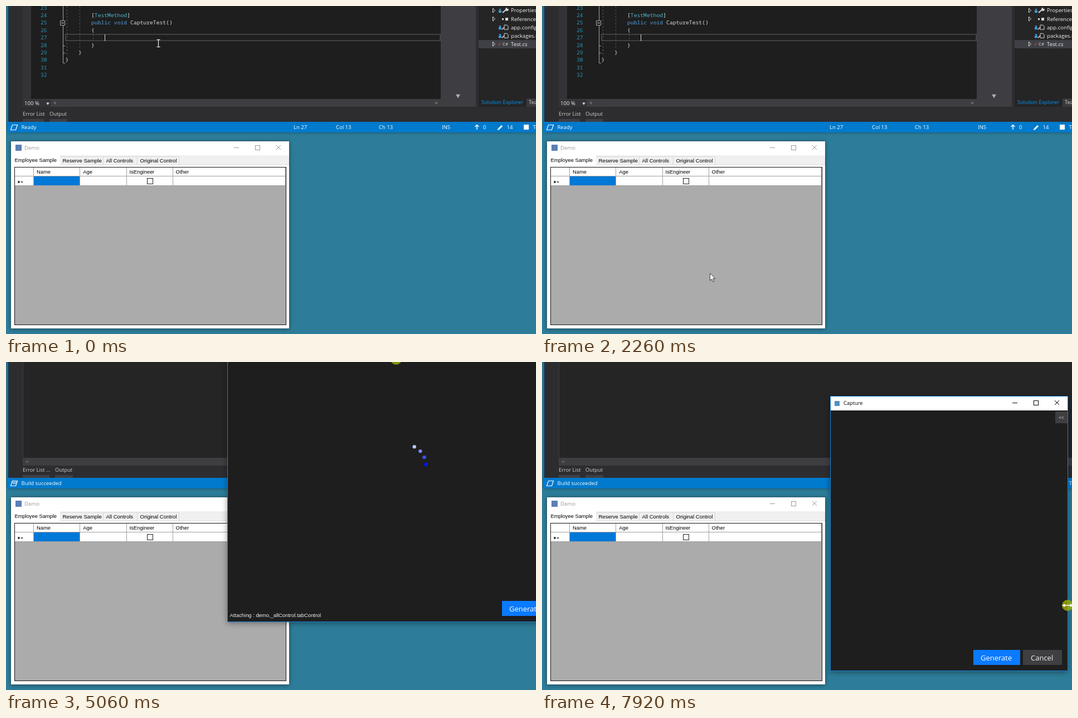
Animation, 951 px wide and 589 px high, one loop 8 s. Source, as an HTML page with a canvas:

```html
<!DOCTYPE html>
<html lang="en">
<head>
<meta charset="utf-8">
<title>Capture demo</title>
<style>
html, body { margin: 0; width: 100%; height: 100%; overflow: hidden; background: #2d7d9a; }
canvas { display: block; }
</style>
</head>
<body>
<canvas id="stage" width="951" height="589"></canvas>
<script>
const g = document.getElementById('stage').getContext('2d');
const LOOP = 8000;
const UI = '"Open Sans", sans-serif', FORM = '"Liberation Sans", sans-serif', MONO = '"Noto Sans Mono", monospace';

// Drawing helpers
function box(x, y, w, h, fill, stroke) {
  if (fill) { g.fillStyle = fill; g.fillRect(x, y, w, h); }
  if (stroke) { g.strokeStyle = stroke; g.lineWidth = 1; g.strokeRect(x + .5, y + .5, w - 1, h - 1); }
}
function text(s, x, y, color, size = 9.6, font = UI) {
  g.font = `${size}px ${font}`;
  g.fillStyle = color;
  g.textBaseline = 'alphabetic';
  g.fillText(s, x, Math.round(y + size * .36));
}
function path(points, fill, stroke, width = 1) {
  g.beginPath();
  points.forEach(([x, y]) => g.lineTo(x, y));
  if (fill) { g.closePath(); g.fillStyle = fill; g.fill(); }
  if (stroke) { g.strokeStyle = stroke; g.lineWidth = width; g.stroke(); }
}
const line = (x1, y1, x2, y2, color, width) => path([[x1, y1], [x2, y2]], null, color, width);
function dot(x, y, r, fill) {
  g.beginPath(); g.arc(x, y, r, 0, 7); g.fillStyle = fill; g.fill();
}
function triangle(x, y, size, angle, color) {
  path([0, 2.1, 4.2].map(a => [x + size * Math.cos(a + angle), y + size * Math.sin(a + angle)]), color);
}
function shadowed(blur, dx, dy, draw) {
  g.save();
  g.shadowColor = 'rgba(0,0,0,.4)';
  g.shadowBlur = blur; g.shadowOffsetX = dx; g.shadowOffsetY = dy;
  draw();
  g.restore();
}
// Linear interpolation through [time, ...values] keys
function track(t, keys) {
  let i = keys.findIndex(k => k[0] > t);
  if (i === 0) return keys[0].slice(1);
  if (i < 0) return keys[keys.length - 1].slice(1);
  const a = keys[i - 1], b = keys[i], f = (t - a[0]) / (b[0] - a[0]);
  return a.slice(1).map((v, n) => v + (b[n + 1] - v) * f);
}

function captions(right, y, color) {
  line(right - 100, y + .5, right - 91, y + .5, color);
  box(right - 62, y - 4, 9, 9, null, color);
  line(right - 24, y - 4, right - 16, y + 4, color);
  line(right - 16, y - 4, right - 24, y + 4, color);
}

function editor(t) {
  box(30, 0, 15, 167, '#333337');
  box(45, 0, 735, 167, '#1e1e1e');
  box(780, 0, 63, 181, '#3e3e42');
  box(30, 167, 750, 14, '#3e3e42');
  triangle(811, 161, 4.5, Math.PI / 2, '#b0b0b0');
  box(30, 168, 50, 13, '#333337');
  text('100 %', 33, 174.5, '#f1f1f1');
  triangle(75, 175, 3, Math.PI / 2, '#ddd');
  triangle(88, 174, 3.5, Math.PI, '#666');
  triangle(772, 174, 3.5, 0, '#666');

  const rowY = n => 3 + (n - 23) * 13.4;
  box(106, 50, 674, 13, null, '#464646');
  box(107, 51, 672, 11, null, '#3a3a3a');
  g.setLineDash([3, 3]);
  [[109.5, 90], [132.5, 77], [156.5, 63]].forEach(([x, y], i) => line(x, i < 2 ? 0 : 51, x, y, '#555'));
  g.setLineDash([]);
  path([[102.5, 0], [102.5, 102.5], [106, 102.5]], null, '#a5a5a5');
  line(102, 71.5, 106, 71.5, '#a5a5a5');
  line(102, 84.5, 106, 84.5, '#a5a5a5');
  box(97, 26, 9, 9, '#1e1e1e', '#a5a5a5');
  line(99, 30.5, 104, 30.5, '#ddd');

  const code = (s, x, n, color) => text(s, x, rowY(n), color, 9.73, MONO);
  for (let n = 23; n <= 32; n++) code(n, 62, n, '#2b91af');
  code('[', 153, 24, '#dcdcdc');
  code('TestMethod', 158.8, 24, '#4db4cc');
  code(']', 217.2, 24, '#dcdcdc');
  code('public void', 153, 25, '#569cd6');
  code('CaptureTest()', 223, 25, '#dcdcdc');
  code('{', 153, 26, '#dcdcdc');
  [[153, 28], [130, 29], [106.6, 30]].forEach(([x, n]) => code('}', x, n, '#dcdcdc'));
  if (t < 540 || t >= 2260) line(177.5, 51, 177.5, 63, '#ddd');
}

function explorer() {
  box(848, 0, 103, 166, '#252526');
  box(848, 61, 103, 15, '#3f3f46');
  box(848, 166, 86, 15, '#252526');
  text('Solution Explorer', 853, 173, '#0097fb', 9.4);
  box(934, 166, 17, 15, '#3a3a3e');
  text('Team', 938, 173, '#d0d0d0', 9.4);
  ['Properties', 'References', 'app.config', 'packages.config', 'Test.cs'].forEach((s, i) => {
    const y = 8 + i * 15.1;
    text(s, 906, y, '#f1f1f1');
    if (i < 2 || i === 4) path([[873.5, y - 4], [877.5, y], [873.5, y + 4], [873.5, y - 4]], null, '#ddd');
    if (i !== 1 && i < 4) {
      box(884, y, 5, 4, '#3c9ad6');
      box(885, y - 3, 3, 4, null, '#3c9ad6');
    }
    if (i === 0) {
      line(891, y + 4, 898, y - 2, '#d8d8d8', 2.2);
      dot(899, y - 2, 3, '#d8d8d8');
      dot(900.5, y - 4, 1.5, '#252526');
    } else if (i === 1) {
      box(890, y - 1, 3, 3, '#d8d8d8');
      box(896, y - 2, 5, 5, '#d8d8d8');
    } else if (i < 4) {
      path([[894, y + 4], [894, y - 4], [899, y - 4], [901, y - 2], [901, y + 4], [894, y + 4]], null, '#d8d8d8');
      line(890, y + 4, 894, y, '#d8d8d8', 1.6);
    } else {
      path([[883, y], [885, y + 2], [888, y - 3]], null, '#c8503c');
      text('C#', 891, y, '#e0e0e0', 8);
    }
  });
}

function statusBar(t) {
  const building = t >= 2410;
  const white = '#fff';
  box(4, 208, 947, 19, '#007acc');
  path([[11.5, 213.5], [20.5, 213.5], [17.5, 222.5], [8.5, 222.5], [11.5, 213.5]], null, white, 1.2);
  if (building && t < 6690) {
    line(11, 216, 20, 216, white, 1.2);
    if (t < 6460 && t % 700 < 400) line(12, 218.5, 18, 218.5, white);
  }
  text(!building ? 'Ready' : t < 3270 ? 'Build started...' : 'Build succeeded', 27.5, 217.5, white, 9.5);
  if (!building) {
    [['Ln 27', 516], ['Col 13', 592], ['Ch 13', 669], ['INS', 782]].forEach(([s, x]) => text(s, x, 217.5, white, 9.5));
  }
  line(845, 214, 845, 222, white, 1.5);
  path([[841.5, 217], [845, 213.5], [848.5, 217]], null, white, 1.5);
  text('0', 856, 217.5, white, 9.5);
  line(884, 221, 890, 215, white, 3);
  path([[882, 223], [882.5, 220], [885, 222.5]], white);
  text('14', 898.5, 217.5, white, 9.5);
  box(929, 213, 9, 9, white);
  text('Test', 945.5, 217.5, white, 9.5);
}

function ide(t) {
  shadowed(6, 0, 0, () => box(4, -20, 947, 247, '#2d2d30'));
  box(3, 0, 1, 227, '#007acc');
  if (t < 2410) {
    editor(t);
    explorer();
  } else {
    box(30, 0, 921, 172, '#252526');
    box(30, 172, 921, 14, '#3e3e42');
    line(30.5, 0, 30.5, 186, '#3f3f46');
    triangle(38, 179, 3.5, Math.PI, '#5c5c60');
  }
  const busy = t >= 2720 && t < 7300;
  const shift = busy ? 10 : 0;
  text(busy ? 'Error List ...' : 'Error List', 30, 193.5, '#d0d0d0', 9.4);
  text('Output', 78 + shift, 193.5, '#d0d0d0', 9.4);
  box(30, 203, 38 + shift, 5, '#3f3f46');
  box(78 + shift, 203, 32, 5, '#3f3f46');
  statusBar(t);
}

function demoForm(active) {
  shadowed(8, 0, 1, () => box(9, 243, 499, 336, '#fff'));
  box(8, 242, 501, 338, null, active ? '#1883d7' : 'rgba(60,80,90,.45)');
  box(17, 249, 11, 11, '#5b7fb5');
  text('Demo', 33, 255, active ? '#000' : '#999');
  captions(509, 254, active ? '#000' : '#999');

  box(10, 268, 498, 17, '#f0f0f0');
  [['Reserve Sample', 97, 78], ['All Controls', 175, 61], ['Original Control', 236, 75]].forEach(([s, x, w]) => {
    box(x - 1, 270, w + 1, 16, '#f0f0f0', '#d9d9d9');
    text(s, x + 4.5, 278, '#000', 9.5, FORM);
  });
  box(10, 285, 498, 1, '#dcdcdc');
  box(10, 268, 87, 18, '#fff');
  text('Employee Sample', 15.5, 276.5, '#000', 9.3, FORM);

  box(15, 289, 488, 284, '#ababab', '#111');
  box(16, 290, 486, 33, '#fff');
  line(16, 305.5, 502, 305.5, '#a0a0a0');
  line(16, 322.5, 502, 322.5, '#a0a0a0');
  [49.5, 132.5, 216.5, 299.5, 501.5].forEach(x => line(x, 290, x, 323, '#a0a0a0'));
  ['Name', 'Age', 'IsEngineer', 'Other'].forEach((s, i) => text(s, 55 + i * 83.2, 298, '#000', 9.4, FORM));
  box(50, 306, 82, 16, '#0078d7');
  box(253, 309, 11, 11, '#fff', '#222');
  triangle(23, 316, 3, 0, '#222');
  text('*', 26.5, 318, '#222', 11, FORM);
}

// Context menu: groups of [label, shortcut]; '>' marks a submenu
const menu = [
  [['Quick Actions and Refactorings...', 'Ctrl+.'], ['Rename...', 'Ctrl+R, Ctrl+R'], ['Remove and Sort Usings', 'Ctrl+R, Ctrl+G']],
  [['Peek Definition', 'Alt+F12'], ['Go To Definition', 'F12'], ['Go To Implementation', 'Ctrl+F12'],
   ['Find All References', 'Shift+F12'], ['View Call Hierarchy', 'Ctrl+K, Ctrl+T']],
  [['Run Test(s)', 'Ctrl+R, T'], ['Debug Test(s)', 'Ctrl+R, Ctrl+T']],
  [['Open code in ILSpy']], [['Breakpoint', '>']], [['Run To Cursor', 'Ctrl+F10']],
  [['Execute in Interactive', 'Ctrl+E, Ctrl+E']], [['Snippet', '>']],
  [['Cut', 'Ctrl+X'], ['Copy', 'Ctrl+C'], ['Paste', 'Ctrl+V']],
  [['Annotation', '>']], [['Outlining', '>']], [['Live Run']],
  [['Capture', 'Ctrl+Shift+C'], ['Execute', 'Ctrl+Shift+E'], ['Debug', 'Ctrl+Shift+D'], ['Select Target']],
  [['Source Control', '>']]
];
const grey = '#c8c8c8';
const robot = (x, y) => box(x - 5, y - 4, 9, 9, '#4f8fbf');
const icons = {
  'Quick Actions and Refactorings...': (x, y) => { dot(x, y - 2, 4.5, '#f0c070'); box(x - 2, y + 2, 4, 4, grey); },
  'Rename...': (x, y) => { box(x - 6, y - 4, 12, 8, null, grey); line(x - 3.5, y - 2, x - 3.5, y + 2, grey); },
  'Peek Definition': (x, y) => { box(x - 4, y - 5, 9, 2, grey); box(x - 2, y - 2, 5, 4, grey); box(x - 4, y + 3, 9, 2, grey); },
  'Go To Definition': (x, y) => { box(x - 1, y - 1, 5, 6, grey); line(x - 5, y - 3, x + 1, y - 3, '#3c9ad6', 2); },
  'View Call Hierarchy': (x, y) => [[-4, -5], [2, -5], [-1, -1], [-4, 3], [2, 3]].forEach(([a, b]) => box(x + a, y + b, 3, 2, grey)),
  'Run Test(s)': (x, y) => { path([[x + 1, y - 4], [x + 5, y + 4], [x - 3, y + 4]], grey); triangle(x - 4, y - 3, 2.5, 0, grey); },
  'Open code in ILSpy': (x, y) => box(x - 4, y - 4, 8, 8, '#6f8ba3'),
  'Run To Cursor': (x, y) => path([[x - 2, y - 5], [x - 2, y + 4], [x, y + 2], [x + 1, y + 5], [x + 2, y + 4], [x + 1, y + 1], [x + 4, y + 1]], grey),
  Cut: (x, y) => {
    line(x - 4, y - 5, x + 2, y + 2, grey); line(x + 4, y - 5, x - 2, y + 2, grey);
    dot(x - 3, y + 3, 2, grey); dot(x + 3, y + 3, 2, grey);
  },
  Copy: (x, y) => { box(x - 2, y - 6, 7, 8, null, grey); box(x - 5, y - 2, 7, 7, '#1b1b1c', grey); },
  Paste: (x, y) => { box(x - 3, y - 4, 8, 9, null, grey); box(x - 1, y - 6, 4, 3, grey); box(x - 5, y, 5, 6, '#1b1b1c', grey); },
  Capture: robot, Execute: robot, Debug: robot, 'Select Target': robot
};
function contextMenu(hoverY) {
  shadowed(3, 2, 2, () => box(233, 54, 288, 514, '#1b1b1c'));
  box(233, 54, 288, 514, null, '#333337');
  let y = 65.8;
  menu.forEach((group, i) => {
    if (i) {
      const ruleY = Math.round(y - 10.5) + .5;
      line(260, ruleY, 518, ruleY, '#333337');
    }
    group.forEach(([label, key]) => {
      if (Math.abs(hoverY - y) < 9.2) box(235, y - 9, 284, 18, '#333334');
      text(label, 263, y, '#f1f1f1');
      if (key === '>') triangle(508.5, y, 2.8, 0, '#aaa');
      else if (key) text(key, 441.5, y, '#f1f1f1');
      if (icons[label]) icons[label](246, Math.round(y));
      y += 18.4;
    });
    y += 2.4;
  });
}

function spinner(t, x, y) {
  const lead = -3 + (t - 5060) / 803 * 360;
  for (let i = 3; i >= 0; i--) {
    const a = (lead - i * 20.5) * Math.PI / 180;
    dot(x + 37 * Math.cos(a), y + 37 * Math.sin(a), 3.2, `rgb(${i * 62},${20 + i * 60},250)`);
  }
}

function captureDialog(t, x, y, right, active) {
  const bottom = y + 494, w = right - x;
  shadowed(10, 0, 2, () => box(x, y, w, 494, '#1e1e1e'));
  box(x, y, w, 494, null, active ? '#1883d7' : '#48484c');
  box(x + 1, y + 1, w - 2, 25, '#fff');
  robot(x + 13, y + 13);
  text('Capture', x + 24, y + 13, '#000', 9.3);
  captions(right, y + 12, '#000');
  box(right - 23, y + 28, 22, 21, '#3f3f42');
  text('<<', right - 17, y + 38.5, '#c8dcec', 8.5);
  box(right - 170, bottom - 38, 84, 27, '#0a7aff', active ? null : '#d0d0d0');
  text('Generate', right - 157, bottom - 24, '#fff', 13);
  box(right - 81, bottom - 38, 70, 27, '#3f3f42');
  text('Cancel', right - 67, bottom - 24, '#f1f1f1', 13);
  if (t < 6060) {
    const control = t < 4800 ? 'contextMenuStrip' : 'tabControl';
    text('Attaching : demo._allControl.' + control, x + 4.5, bottom - 12.5, '#f1f1f1', 9.4, FORM);
  }
  if (t < 6310) {
    const [dx, dy] = track(t, [[5060, 319.5, 212.5], [5500, 331, 253]]);
    spinner(t, x + dx, y + dy);
  }
}

// Mouse pointers
const halo = (x, y) => dot(x, y, 10, 'rgba(160,180,0,.78)');
function arrow(x, y) {
  const shape = [[0, 0], [0, 13], [3, 10.3], [5, 15.3], [7.3, 14.3], [5.2, 9.5], [9.3, 9.5], [0, 0]];
  path(shape.map(([a, b]) => [x + a, y + b]), '#fff', '#111', .8);
}
function beam(x, y) {
  line(x, y - 6, x, y + 6, '#eee', 1.2);
  [-6.5, 6.5].forEach(d => line(x - 3, y + d, x + 3, y + d, '#eee', 1.2));
}
function resizer(x, y) {
  line(x - 7, y, x + 7, y, '#fff', 1.5);
  triangle(x - 6.5, y, 3.5, Math.PI, '#fff');
  triangle(x + 6.5, y, 3.5, 0, '#fff');
}

const pointerKeys = [
  [1050, 233, 54], [1700, 300, 475], [1790, 301.5, 480], [2410, 301.5, 480],
  [2570, 400, 420], [3270, 588, 200], [3700, 640, -30]
];
const dialogKeys = [[4530, 260, -415], [5060, 397, -27], [5500, 517, 61]];

function pointer(t, x, y, right) {
  if (t < 910) {
    const [px, py] = track(t, [[70, 273.5, 67], [640, 233, 54]]);
    if (t >= 690) halo(px, py);
    beam(px, py);
  } else if (t < 4290) {
    const [px, py] = track(t, pointerKeys);
    if (t >= 2030 && t < 2260) halo(px, py);
    arrow(px, py);
  } else if (t < 5500) {
    // While dragging, the arrow trails above the click halo
    if (t >= 4530) halo(x + 303, y + 22);
    arrow(x + 303, y + 8);
  } else if (t < 6000) {
    arrow(...track(t, [[5500, 820, 69], [5860, 1000, 210]]));
  } else {
    if (t >= 6920) halo(right - 1, 437);
    resizer(right - 1, 437);
  }
}

function draw(t) {
  box(0, 0, 951, 589, '#2d7d9a');
  ide(t);
  demoForm(t >= 3420 && t < 4530);
  if (t >= 910 && t < 2260) contextMenu(t < 1050 ? 0 : track(t, pointerKeys)[1]);
  const [x, y] = track(t, dialogKeys).map(Math.round);
  const right = t < 6920 ? x + 663 : Math.round(track(t, [[6920, 1180], [7690, 936], [7770, 938], [7920, 944]])[0]);
  if (t >= 3420) captureDialog(t, x, y, right, t >= 4530);
  pointer(t, x, y, right);
}

const start = performance.now();
function frame() {
  draw((performance.now() - start) % LOOP);
  requestAnimationFrame(frame);
}
frame();
</script>
</body>
</html>
```
